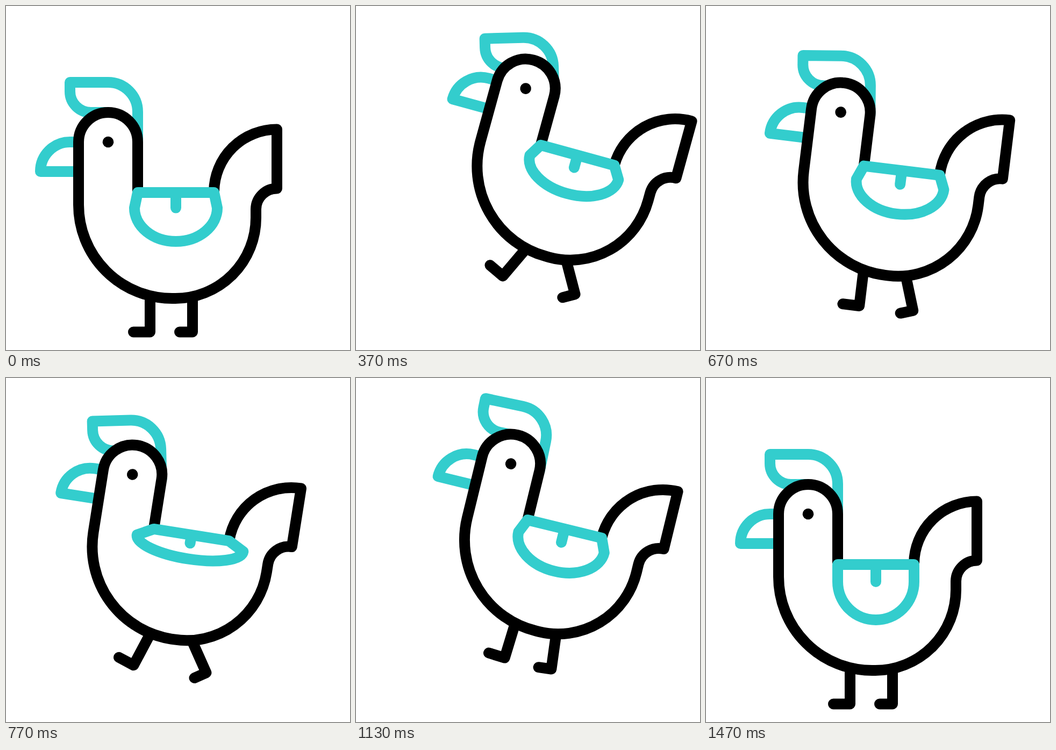
Animation of 640x640 px, one loop 1670 ms. Source, as an HTML page:

```html
<!DOCTYPE html>
<html>
<head>
<meta charset="utf-8">
<style>
  html, body { margin: 0; height: 100%; overflow: hidden; background: #fff; }
  svg { display: block; width: 100vw; height: 100vh; }
  path { fill: none; stroke: #000; stroke-width: 20; stroke-linecap: round; stroke-linejoin: round; }
  .teal { stroke: #33cdcd; }
  .solid { fill: #fff; }
  #body { stroke-linecap: butt; }
</style>
</head>
<body>
<svg viewBox="0 0 640 640">
  <g id="bird">
    <path id="crest" class="teal" d="M245 253V197A55 55 0 0 0 190 142H119V159A39 39 0 0 0 158 198H190"/>
    <path class="teal" d="M135 308H64A55 55 0 0 1 119 253H135"/>
    <path id="backLeg" d="M268 544V606.5H237"/>
    <path id="frontLeg" d="M347 540V606.5H323"/>
    <path id="body" class="solid" d="M245 345V253A55 55 0 0 0 135 253V370A174 174 0 0 0 309 544H315A150 150 0 0 0 465 394V378A39 39 0 0 1 504 339.5V229.5A117 117 0 0 0 387 345"/>
    <circle cx="190" cy="253" r="10.3"/>
    <path id="wing" class="teal solid"/>
  </g>
</svg>
<script>
const LOOP = 1670, STEP = 100 / 3, LAST = 45;
const el = id => document.getElementById(id);

// Two hops: [step, x, lift, tilt, crest, back leg, front leg]; missing values are at rest
const poses = [
  [1],
  [12, 44, 77.5, 15.4, -17, 25, -30],
  [17, 64.6, 28, 5.2, 0, -29.5, 3],
  [24, -1.8, 58, 9, -10.5, 19, -33],
  [30, 8.8, 76.2, 12, -6.7, 10, -18],
  [33.5, 27, 79, 14.5, -3, 5, -9],
  [39, 15.3, 34, 8.2],
  [LAST]
];

// Smooth curve through the poses that turns only at a pose
function valueAt(n, part) {
  const y = i => poses[i][part] || 0;
  const width = i => poses[i + 1][0] - poses[i][0];
  const slope = i => poses[i + 1] && i >= 0 ? (y(i + 1) - y(i)) / width(i) : 0;
  const tangent = i => {
    const a = slope(i - 1), b = slope(i);
    return a * b > 0 ? 2 * a * b / (a + b) : 0;
  };
  const i = Math.max(0, poses.findIndex(p => p[0] >= n) - 1);
  const s = (n - poses[i][0]) / width(i), r = 1 - s;
  return y(i) * r * r * (1 + 2 * s) + y(i + 1) * s * s * (1 + 2 * r)
    + width(i) * s * r * (tangent(i) * r - tangent(i + 1) * s);
}

// Five flaps, back and forth at constant speed, a little faster in the second half
function flap(n) {
  const stroke = n < 24 ? n / 4.8 : 5 + (n - 24) / 4.2;
  return 1 - Math.abs(stroke % 2 - 1);
}

function wingPath(p) {
  const out = 29 * p, side = 32 - 16.5 * p, y = 347 + side;
  return `M245 347H387L${387 + out} ${y}A${71 + out} ${71 - 41.5 * p} 0 0 1 ${245 - out} ${y}ZM316 347v${side}`;
}

function draw(n) {
  const [x, lift, tilt, crest, back, front] = [1, 2, 3, 4, 5, 6].map(part => valueAt(n, part));
  const place = (id, angle, pivot, move = '') =>
    el(id).setAttribute('transform', `${move} rotate(${angle} ${pivot})`);
  place('bird', tilt, '312 544', `translate(${x} ${-lift})`);
  place('crest', crest, '245 253');
  place('backLeg', back, '268 544');
  place('frontLeg', front, '347 540');
  el('wing').setAttribute('d', wingPath(flap(n)));
}

const start = performance.now();
function tick() {
  const t = (performance.now() - start) % LOOP;
  draw(Math.min(LAST, 1 + Math.floor((t + 4) / STEP)));
  requestAnimationFrame(tick);
}
tick();
</script>
</body>
</html>
```
